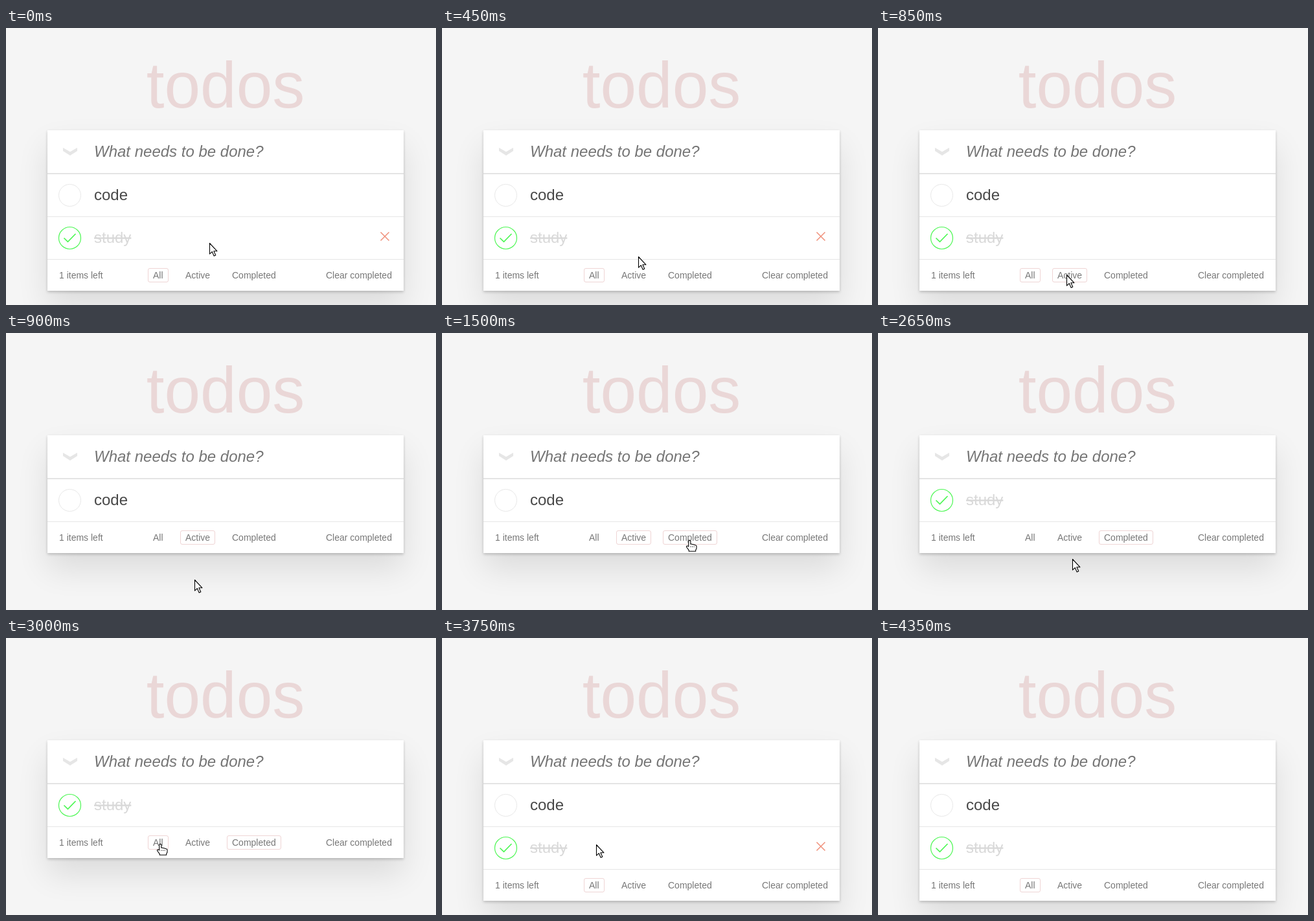
Write an HTML page that moves like this. It is 664 px wide and 428 px high and loops after 4500 ms.

```html
<!DOCTYPE html>
<html lang="en">
<head>
<meta charset="utf-8">
<title>Todo list</title>
<style>
  html, body { margin: 0; width: 100%; height: 100%; overflow: hidden; background: #f5f5f5; }
  svg { display: block; width: 664px; height: 428px; }
  text { font-family: "Liberation Sans", Arial, sans-serif; white-space: pre; }
  .title { font-size: 100px; fill: rgba(175, 47, 47, .15); }
  .prompt { font-size: 24px; font-style: italic; fill: #757575; }
  .label { font-size: 24px; fill: #484848; }
  .done { fill: #d9d9d9; text-decoration: line-through; }
  .small { font-size: 14px; fill: #777; }
  .border { fill: none; stroke: rgba(175, 47, 47, .2); }
  .soft { filter: blur(25px); opacity: .1; }
  .tight { filter: blur(2px); opacity: .2; }
  .remove { fill: none; stroke: #f0917b; stroke-width: 1.5; }
  .pointer { fill: #fff; stroke: #000; stroke-width: 1.1; stroke-linejoin: round; }
</style>
</head>
<body>
<svg viewBox="0 0 664 428">
  <rect width="664" height="428" fill="#f5f5f5"/>
  <text class="title" x="339" y="123" text-anchor="middle">todos</text>
  <rect class="soft card" x="64" y="183" width="550"/>
  <rect class="tight card" x="64" y="160" width="550"/>
  <rect class="card" x="64" y="158" width="550" fill="#fff"/>
  <path d="M88 185L99 191.3L110 185V190L99 197L88 190Z" fill="#e6e6e6"/>
  <text class="prompt" x="136" y="199">What needs to be done?</text>
  <rect x="64" y="224" width="550" height="2" fill="#e4e4e4"/>

  <g id="code">
    <circle cx="98.5" cy="258.5" r="17" fill="none" stroke="#e8e8e8"/>
    <text class="label" x="136" y="266">code</text>
    <rect x="64" y="291" width="550" height="1" fill="#e6e6e6"/>
  </g>
  <g id="study">
    <g fill="none" stroke="#4df754">
      <circle cx="98.5" cy="258.5" r="17" stroke-width="1.2"/>
      <path d="M89.5 258.5L95.5 264.3L107.5 252" stroke-width="1.7"/>
    </g>
    <text class="label done" x="136" y="266">study</text>
    <rect x="64" y="291" width="550" height="1" fill="#e6e6e6"/>
  </g>
  <path id="remove" class="remove" d="M578.5 249.5L591.5 262.5M591.5 249.5L578.5 262.5"/>

  <g id="footer">
    <text class="small" x="82" y="321">1 items left</text>
    <text class="small" x="494" y="321">Clear completed</text>
  </g>

  <path id="arrow" class="pointer" d="M.5 .5V17.2L4.3 13.7L7.2 20.2L9.8 19L6.9 12.8H12Z"/>
  <g id="hand" class="pointer">
    <path d="M-1.3 9V1.2Q-1.3 -.6 .3 -.6Q1.9 -.6 1.9 1.2V5.3Q3.3 4.6 4.6 5.7Q6 5.2 7.2 6.3Q8.5 5.9 9.5 7Q11 6.8 11 8.5V12L9.7 14.5V16.3H-.8V14.6L-4.2 10Q-5 8.6 -3.8 8.1Q-2.5 7.7 -1.3 9Z"/>
    <path d="M1.9 8.5V10M4.6 8.5V10M7.2 8.5V10" stroke-width=".8"/>
  </g>
</svg>
<script>
const LOOP = 4500, STEP = 50, ROW = 66;
const $ = id => document.getElementById(id);

const filters = [
  { name: 'All', x: 219, width: 32 },
  { name: 'Active', x: 269, width: 54 },
  { name: 'Completed', x: 341, width: 84 }
];

// Pointer hotspot: time, x, y
const path = [
  [0, 314, 332], [300, 314, 332], [600, 291, 373], [800, 291, 373],
  [850, 291, 381], [1150, 291, 381], [1200, 322, 374], [1450, 322, 374],
  [1500, 382, 321], [1650, 381, 319], [2350, 381, 319], [2450, 365, 335],
  [2600, 318, 353], [2750, 265, 342], [2850, 242, 328], [3000, 238, 319],
  [3850, 238, 319], [4000, 196, 252], [4300, 20, 2], [4350, 0, -40], [4500, 0, -40]
];

function make(tag, attrs, text = '') {
  const node = document.createElementNS('http://www.w3.org/2000/svg', tag);
  for (const key in attrs) node.setAttribute(key, attrs[key]);
  node.textContent = text;
  return $('footer').appendChild(node);
}

for (const f of filters) {
  make('text', { class: 'small', x: f.x + 8, y: 321 }, f.name);
  f.border = make('rect', { class: 'border', x: f.x + .5, y: 305.5, width: f.width - 1, height: 21, rx: 2.5 });
}

function pointerAt(t) {
  const i = path.findIndex(key => key[0] > t);
  const [t0, x0, y0] = path[i - 1], [t1, x1, y1] = path[i];
  const k = (t - t0) / (t1 - t0);
  return [Math.round(x0 + (x1 - x0) * k), Math.round(y0 + (y1 - y0) * k)];
}

const show = (node, on) => node.setAttribute('visibility', on ? 'visible' : 'hidden');
const move = (node, x, y) => node.setAttribute('transform', `translate(${x} ${y})`);

function render(time) {
  const t = Math.floor(time % LOOP / STEP) * STEP;
  const [x, y] = pointerAt(t);
  const selected = t < 900 || t >= 3750 ? 'All' : t < 1900 ? 'Active' : 'Completed';
  const rows = selected === 'All' ? 2 : 1;
  const shift = (rows - 1) * ROW;

  document.querySelectorAll('.card').forEach(card => card.setAttribute('height', 182 + shift));
  show($('code'), selected !== 'Completed');
  show($('study'), selected !== 'Active');
  move($('study'), 0, shift);
  move($('footer'), 0, shift);

  const hovered = filters.find(f =>
    x >= f.x && x < f.x + f.width && y >= 305 + shift && y < 327 + shift);
  for (const f of filters) show(f.border, f === hovered || f.name === selected);

  const row = Math.floor((y - 226) / ROW);
  show($('remove'), x >= 64 && x < 614 && row >= 0 && row < rows);
  move($('remove'), 0, row * ROW);

  const hand = hovered && t >= 1500;
  show($('hand'), hand);
  show($('arrow'), !hand);
  move($('hand'), x, y);
  move($('arrow'), x, y);
}

const start = performance.now();
function tick() {
  render(performance.now() - start);
  requestAnimationFrame(tick);
}
tick();
</script>
</body>
</html>
```
